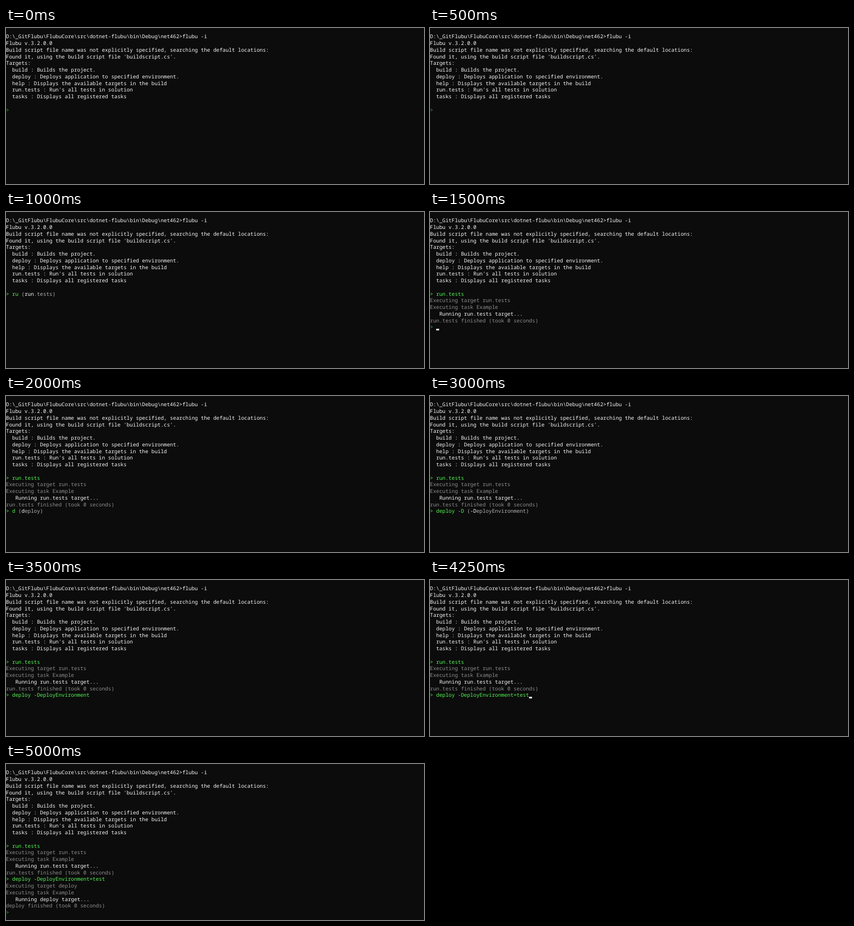
An HTML page for the animation above (5.25 s loop, 864 by 322 pixels).

```html
<!DOCTYPE html>
<html lang="en">
<head>
<meta charset="utf-8">
<title>Interactive build console</title>
<style>
  html, body { margin: 0; width: 100%; height: 100%; overflow: hidden; background: #0c0c0c; }
  svg { display: block; }
  text {
    font: 500 10.667px "Noto Sans Mono", "DejaVu Sans Mono", monospace;
    white-space: pre;
    text-rendering: geometricPrecision;
  }
</style>
</head>
<body>
<svg id="stage" width="864" height="322" viewBox="0 0 864 322">
  <rect width="864" height="322" fill="#0c0c0c"/>
  <g id="lines"></g>
  <rect id="cursor" width="6" height="3.4" fill="#f2f2f2"/>
</svg>
<script>
const NS = "http://www.w3.org/2000/svg";
const LOOP = 5250, CELL = 6.4, PITCH = 13.75, BASE = 21.3;
const WHITE = "#f8f8f8", GRAY = "#8e8e8e", HINT = "#b4b4b4", GREEN = "#55f855", PROMPT = "#3fb944";
const FIRST_ROW = 11, SECOND_ROW = 16, LAST_ROW = 21;

const intro = String.raw`D:\_GitFlubu\FlubuCore\src\dotnet-flubu\bin\Debug\net462>flubu -i
Flubu v.3.2.0.0
Build script file name was not explicitly specified, searching the default locations:
Found it, using the build script file 'buildscript.cs'.
Targets:
  build : Builds the project.
  deploy : Deploys application to specified environment.
  help : Displays the available targets in the build
  run.tests : Run's all tests in solution
  tasks : Displays all registered tasks`.split("\n");

// Each step: start time, prompt row, typed text, completion hint, cursor shown
const steps = [
  [0, FIRST_ROW, "", "", false],
  [750, FIRST_ROW, "r", "run.tests", true],
  [1000, FIRST_ROW, "ru", "run.tests", false],
  [1250, FIRST_ROW, "run.tests", "", true],
  [1500, SECOND_ROW, "", "", true],
  [2000, SECOND_ROW, "d", "deploy", false],
  [2250, SECOND_ROW, "de", "deploy", false],
  [2500, SECOND_ROW, "deploy", "", false],
  [2750, SECOND_ROW, "deploy -", "-DeployEnvironment", false],
  [3000, SECOND_ROW, "deploy -D", "-DeployEnvironment", false],
  [3250, SECOND_ROW, "deploy -De", "-DeployEnvironment", false],
  [3500, SECOND_ROW, "deploy -DeployEnvironment", "", false],
  [3750, SECOND_ROW, "deploy -DeployEnvironment=", "", true],
  [4000, SECOND_ROW, "deploy -DeployEnvironment=te", "", true],
  [4250, SECOND_ROW, "deploy -DeployEnvironment=test", "", true],
  [4500, LAST_ROW, "", "", true],
  [5000, LAST_ROW, "", "", false]
];

const lines = document.getElementById("lines");
const cursor = document.getElementById("cursor");

function write(row, ...parts) {
  const line = document.createElementNS(NS, "text");
  line.setAttribute("x", 0);
  line.setAttribute("y", BASE + row * PITCH);
  for (const [content, color] of parts) {
    const span = document.createElementNS(NS, "tspan");
    span.textContent = content;
    span.setAttribute("fill", color);
    line.append(span);
  }
  lines.append(line);
}

function writeRun(row, command, target) {
  write(row, ["> " + command, GREEN]);
  write(row + 1, ["Executing target " + target, GRAY]);
  write(row + 2, ["Executing task Example", GRAY]);
  write(row + 3, [`   Running ${target} target...`, WHITE]);
  write(row + 4, [target + " finished (took 0 seconds)", GRAY]);
}

function writePrompt(row, typed, hint) {
  const parts = [["> " + typed, typed ? GREEN : PROMPT]];
  if (hint) {
    const split = hint.startsWith("run") ? 3 : typed.split(" ").pop().length;
    parts.push([" (", HINT], [hint.slice(0, split), WHITE], [hint.slice(split) + ")", HINT]);
  }
  write(row, ...parts);
}

let shown = null;
function render(time) {
  const step = steps.findLast(([start]) => start <= time);
  if (step === shown) return;
  shown = step;
  const [, row, typed, hint, blink] = step;
  lines.replaceChildren();
  intro.forEach((content, i) => write(i, [content, WHITE]));
  if (row > FIRST_ROW) writeRun(FIRST_ROW, "run.tests", "run.tests");
  if (row > SECOND_ROW) writeRun(SECOND_ROW, "deploy -DeployEnvironment=test", "deploy");
  writePrompt(row, typed, hint);
  cursor.setAttribute("x", (2 + typed.length) * CELL);
  cursor.setAttribute("y", BASE + row * PITCH - 0.3);
  cursor.setAttribute("visibility", blink ? "visible" : "hidden");
}

const begin = performance.now();
function tick() {
  render((performance.now() - begin) % LOOP);
  requestAnimationFrame(tick);
}
tick();
</script>
</body>
</html>
```
